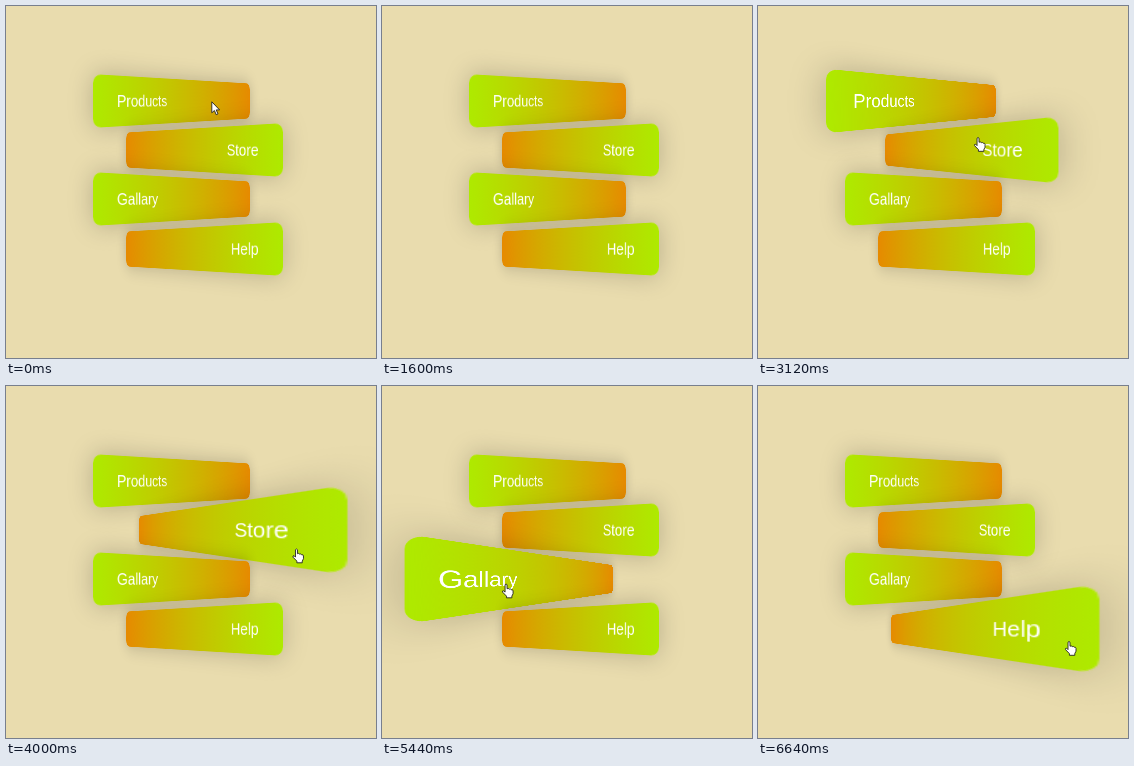
An HTML page that plays this animation: 370x352 px, repeating every 6720 ms.

```html
<!DOCTYPE html>
<html lang="en">
<head>
<meta charset="utf-8">
<title>Menu</title>
<style>
html, body { margin: 0; width: 100%; height: 100%; overflow: hidden; background: #e9dcae; }
#stage { position: relative; width: 370px; height: 352px; overflow: hidden; }
.item {
  position: absolute; left: 32.25px; width: 300px; height: 60px;
  box-sizing: border-box; padding-right: 32px; border-radius: 10px;
  font: 20px/60px "Liberation Sans", Arial, sans-serif; color: #fff;
  background: linear-gradient(to right, #aeea00, #e68a00);
  box-shadow: 0 0 30px rgba(0, 0, 0, .22);
}
.item.even { text-align: right; background: linear-gradient(to left, #aeea00, #e68a00); }
#cursor { position: absolute; left: 0; top: 0; width: 370px; height: 352px; }
#cursor path { fill: #fff; stroke: #222; stroke-width: .9; stroke-linejoin: round; }
</style>
</head>
<body>
<div id="stage">
  <svg id="cursor" viewBox="0 0 370 352">
    <path id="arrow" d="M0 0V11L2.6 8.7L4.4 12.9L6.2 12.1L4.4 8.1H7.8Z"/>
    <path id="hand" d="M-1 8.6V1.2Q0 -.2 1 1.2V5.2Q2.4 4.4 3.2 5.6Q4.5 5 5.2 6.2Q6.8 5.8 7 7.4V10.2L5.8 12.6V14.3H.4V12.6L-3.4 8.7Q-4 7 -2.4 7.2Z"/>
  </svg>
</div>
<script>
const LOOP = 6720, TRANSITION = 750, HOVER_GAP = 40;
const SCALE = 0.706, TOP = 64.6, PITCH = 49.4;

const items = [
  { label: 'Products', enter: 1995 },
  { label: 'Store', enter: 2905 },
  { label: 'Gallary', enter: 4045 },
  { label: 'Help', enter: 5485 }
];

// The pointer eases from each stop to the next.
const stops = [
  { at: 1800, x: 354, y: 130 },
  { at: 2160, x: 230, y: 100 },
  { at: 3120, x: 220, y: 131 },
  { at: 4000, x: 290.5, y: 162.5 },
  { at: 5440, x: 124, y: 197.5 },
  { at: 6640, x: 311, y: 255 }
];

const stage = document.getElementById('stage');
const cursor = document.getElementById('cursor');
const arrow = document.getElementById('arrow');
const hand = document.getElementById('hand');

items.forEach((item, i) => {
  item.leave = i + 1 < items.length ? items[i + 1].enter - HOVER_GAP : LOOP;
  item.angle = i % 2 ? -45 : 45;
  item.el = document.createElement('div');
  item.el.className = i % 2 ? 'item even' : 'item';
  item.el.textContent = item.label;
  item.el.style.top = TOP + PITCH * i + 'px';
  stage.insertBefore(item.el, cursor);
});

const mix = (a, b, f) => a + (b - a) * f;
const clamp = v => Math.min(1, Math.max(0, v));
const bezier = (a, b, s) => 3 * a * s * (1 - s) ** 2 + 3 * b * s * s * (1 - s) + s ** 3;

// cubic-bezier(.25, .1, .25, 1)
function ease(x) {
  x = clamp(x);
  if (x === 0 || x === 1) return x;
  let lo = 0, hi = 1;
  for (let i = 0; i < 24; i++) {
    const mid = (lo + hi) / 2;
    if (bezier(0.25, 0.25, mid) < x) lo = mid; else hi = mid;
  }
  return bezier(0.1, 1, lo);
}

function hoverAmount({ enter, leave }, t) {
  const rise = ease((Math.min(t, leave) - enter) / TRANSITION);
  return rise * (1 - ease((t - leave) / TRANSITION));
}

function pointerAt(t) {
  const to = stops.find(s => s.at > t) || stops[stops.length - 1];
  const from = stops[stops.indexOf(to) - 1];
  const f = ease((t - from.at) / (to.at - from.at));
  return { x: mix(from.x, to.x, f), y: mix(from.y, to.y, f) };
}

function place(el, visible, { x, y }) {
  el.setAttribute('visibility', visible ? 'visible' : 'hidden');
  el.setAttribute('transform', `translate(${x} ${y})`);
}

function drawCursor(t) {
  const idle = t < 80, moving = t >= stops[0].at;
  const over = t >= items[0].enter;
  const pos = moving ? pointerAt(t) : { x: 205.8, y: 95.8 };
  place(arrow, idle || (moving && !over), pos);
  place(hand, over, pos);
}

function render(t) {
  for (const item of items) {
    const k = hoverAmount(item, t);
    const depth = 1 / mix(1 / 500, 1 / 200, k);
    item.el.style.paddingLeft = mix(31.5, 16.5, k) + 'px';
    item.el.style.transform =
      `scale(${SCALE}) perspective(${depth}px) rotateY(${item.angle}deg)`;
  }
  drawCursor(t);
}

const start = performance.now();
function tick() {
  render((performance.now() - start) % LOOP);
  requestAnimationFrame(tick);
}
tick();
</script>
</body>
</html>
```
